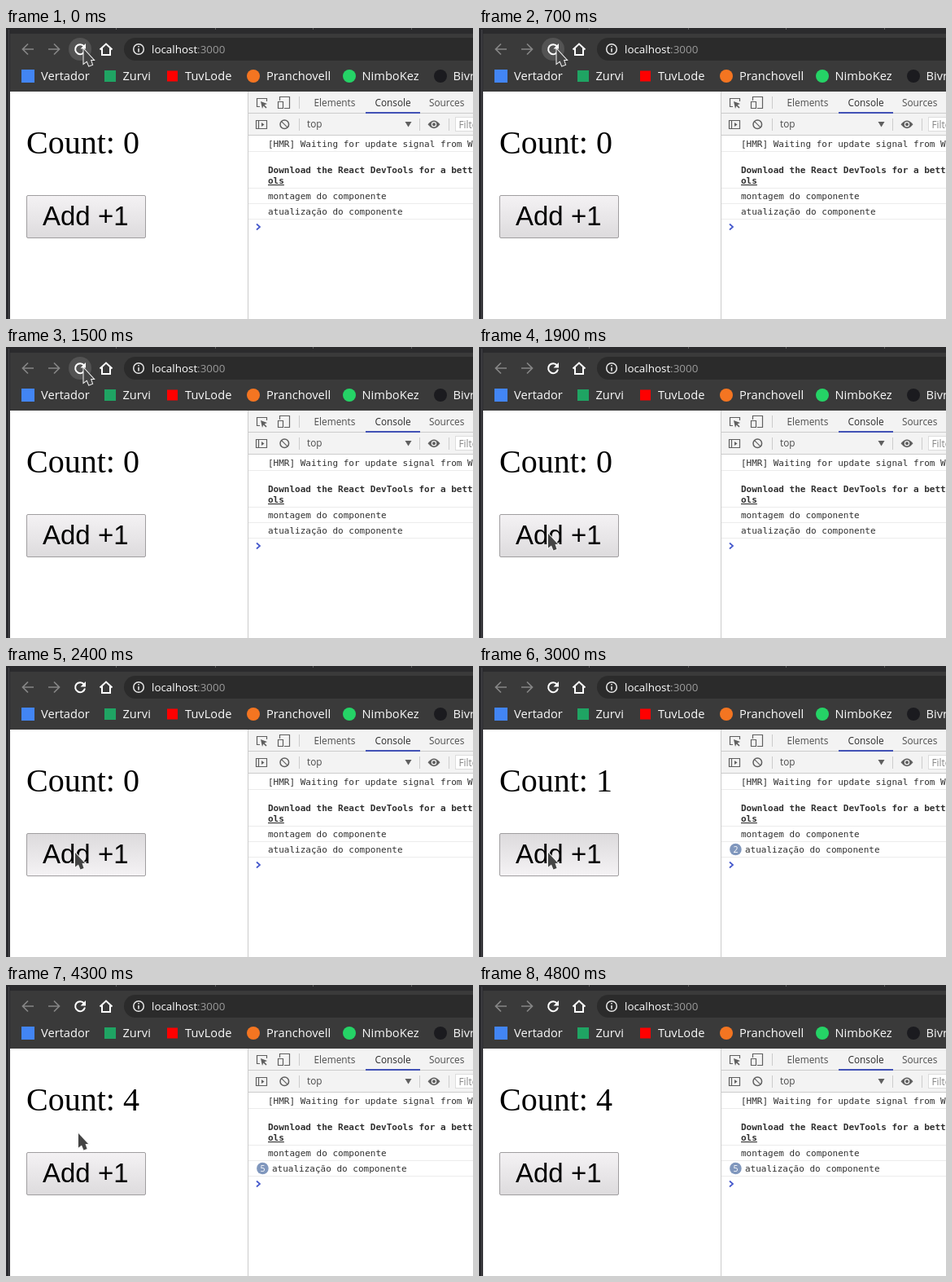
An HTML page for the animation above (4900 ms loop, 574 by 357 pixels).

```html
<!DOCTYPE html>
<html lang="pt">
<head>
<meta charset="utf-8">
<style>
html, body { margin: 0; height: 100%; overflow: hidden; background: #fff; }
svg { display: block; }
text { white-space: pre; }
.ui { font-family: "Open Sans", "Noto Sans", sans-serif; }
.mark { font-size: 14.67px; fill: #fafafa; }
.tab { font-size: 11.8px; fill: #4c4c4c; }
.log { font: 11px "DejaVu Sans Mono", monospace; fill: #303030; }
.nav { fill: none; stroke-width: 2; }
.tool { fill: none; stroke: #5f5f5f; stroke-width: 1.2; }
.solid { fill: #5f5f5f; stroke: none; }
.rule { stroke: #ccc; }
.row { stroke: #ececec; }
#cursor { fill: #444; stroke: #f4f4f4; stroke-width: 2; paint-order: stroke; }
</style>
</head>
<body>
<svg width="574" height="357" viewBox="0 0 574 357">
  <defs>
    <linearGradient id="up" x2="0" y2="1"><stop stop-color="#f4f2f4"/><stop offset="1" stop-color="#dddbdd"/></linearGradient>
    <linearGradient id="down" x2="0" y2="1"><stop stop-color="#dcdadc"/><stop offset="1" stop-color="#f5f3f5"/></linearGradient>
  </defs>

  <!-- browser bar -->
  <rect width="574" height="78" fill="#3a3a3a"/>
  <rect width="574" height="7" fill="#2b2b2d"/>
  <path d="M135.5 0v2M257.5 0v2M377.5 0v2M498.5 0v2" stroke="#606060"/>
  <rect x="145" y="12" width="460" height="28" rx="14" fill="#2b2b2b"/>
  <circle id="hover" cx="91" cy="26" r="14" fill="#535353"/>
  <g class="nav">
    <path d="M34 26H21M27 19.5L20.5 26l6.5 6.5M52 26h13M59 19.5l6.5 6.5-6.5 6.5" stroke="#868686" stroke-width="1.7"/>
    <path d="M96 22.6A6 6 0 1 0 97 27.5" stroke="#fff"/>
    <path d="M98 19v6.5h-6.5z" fill="#fff"/>
    <path d="M115.5 26.5L123 19.5l7.5 7M118 25v8h10v-8" stroke="#fff"/>
    <circle cx="163" cy="26" r="6.3" stroke="#e8e8e8" stroke-width="1.5"/>
    <path d="M163 25v4.5M163 22v1.6" stroke="#e8e8e8" stroke-width="1.6"/>
  </g>
  <text class="ui" x="179" y="31" font-size="13.4" fill="#fff">localhost<tspan fill="#9a9a9a">:3000</tspan></text>
  <rect x="19" y="51" width="16" height="16" fill="#4285f4"/>
  <rect x="121" y="52" width="14" height="14" fill="#1fa463"/>
  <rect x="198" y="52.5" width="13" height="13" fill="#f00"/>
  <circle cx="304" cy="59" r="8" fill="#f47521"/>
  <circle cx="422" cy="59" r="8" fill="#25d366"/>
  <circle cx="534" cy="59" r="8" fill="#1b1b1f"/>
  <g class="ui mark">
    <text x="43" y="64">Vertador</text>
    <text x="143.5" y="64">Zurvi</text>
    <text x="220" y="64">TuvLode</text>
    <text x="320" y="64">Pranchovell</text>
    <text x="437.5" y="64">NimboKez</text>
    <text x="549.5" y="64">Bivren</text>
  </g>

  <!-- page -->
  <text id="count" x="25" y="154" font-family="Liberation Serif, Times, serif" font-size="40"></text>
  <rect id="button" x="25.5" y="205.5" width="146" height="52" rx="1.5" stroke="#a09ea0"/>
  <text x="45" y="242" font-family="Liberation Sans, Arial, sans-serif" font-size="33">Add +1</text>

  <!-- developer tools -->
  <rect x="298" y="78" width="276" height="53" fill="#f3f3f3"/>
  <path class="rule" d="M297.5 78V357M298 104.5H574M298 131.5H574M360.5 84v15M360.5 111v15M508.5 111v15M544.5 111v15"/>
  <rect x="442" y="103" width="67" height="2" fill="#4252b5"/>
  <g class="tool">
    <path d="M312 96.5H308.5V86.5H320.5V90"/>
    <path class="solid" d="M313 90l8 3-3.4 1.4 3 3-1.2 1.2-3-3-1.4 3.4z"/>
    <path d="M336.5 89V84.5H348.5V98.5H342M334.5 90.5h6v8h-6z"/>
    <path d="M307.5 113.5h13v10h-13zM310.5 113.5v10"/>
    <path class="solid" d="M314 116l3.5 2.5-3.5 2.5z"/>
    <path d="M338.6 114.6l7.5 7.5"/>
    <circle cx="342.3" cy="118.3" r="5.3" stroke-width="1.5"/>
    <path class="solid" d="M518.5 118.3Q526 108.5 533.5 118.3Q526 128 518.5 118.3z"/>
    <circle cx="526" cy="118.3" r="2.6" stroke="#f3f3f3"/>
    <path class="solid" d="M490.5 115h8l-4 6.500z"/>
  </g>
  <rect x="552.5" y="109.5" width="40" height="17" fill="#fff" stroke="#ddd"/>
  <g class="ui tab">
    <text x="378.5" y="96">Elements</text>
    <text x="453.5" y="96" style="fill:#2c2c2c">Console</text>
    <text x="520" y="96">Sources</text>
    <text x="370" y="122">top</text>
    <text x="556.5" y="122.5" style="fill:#858585">Filter</text>
  </g>
  <path class="row" d="M298 151.5H574M298 196.5H574M298 215.5H574M298 234.5H574"/>
  <g class="log">
    <text x="322" y="146">[HMR] Waiting for update signal from WDS...</text>
    <g font-weight="bold">
      <text x="322" y="178">Download the React DevTools for a better</text>
      <text x="322" y="191" text-decoration="underline">ols</text>
    </g>
    <text x="322" y="210">montagem do componente</text>
    <text id="update" y="229">atualização do componente</text>
  </g>
  <g id="badge">
    <circle cx="315.4" cy="225" r="7.3" fill="#8097bd"/>
    <text id="times" class="ui" x="315.4" y="229" font-size="10.5" text-anchor="middle" fill="#fff"></text>
  </g>
  <path d="M308 240.5l4 3.5-4 3.5" fill="none" stroke="#4458cc" stroke-width="1.7"/>

  <!-- window edge -->
  <rect y="1" width="5" height="356" fill="#29292d"/>
  <path d="M3.5 2V357" stroke="#48484c"/>

  <path id="cursor" d="M0 0V17.5L4 14.5L6.5 20.5L10.500 19L8.500 13H12z"/>
</svg>
<script>
const el = id => document.getElementById(id);
const LOOP = 4900, STEP = 100;
const clicks = [[2400, 2600], [3000, 3100], [3500, 3800], [3900, 4000]];
const logged = [3000, 3100, 3800, 4000];
// time, x, y of the pointer
const path = [
  [1500, 95.5, 26], [1600, 94, 62], [1700, 91, 125], [1800, 87, 195], [1900, 85, 229],
  [4100, 85, 229], [4200, 87, 213], [4300, 89, 182], [4500, 91, 90], [4700, 95, 10]
];

function pointerAt(t) {
  if (t <= path[0][0]) return path[0].slice(1);
  const i = path.findIndex(p => p[0] >= t);
  if (i < 0) return null;
  const [t0, x0, y0] = path[i - 1], [t1, x1, y1] = path[i];
  const k = (t - t0) / (t1 - t0);
  return [x0 + (x1 - x0) * k, y0 + (y1 - y0) * k];
}

function draw(now) {
  const t = Math.floor(now % LOOP / STEP) * STEP;
  const pos = pointerAt(t);
  const pressed = clicks.some(([a, b]) => t >= a && t < b);
  const times = 1 + logged.filter(a => t >= a).length;

  el("count").textContent = "Count: " + clicks.filter(c => t >= c[1]).length;
  el("button").setAttribute("fill", pressed ? "url(#down)" : "url(#up)");
  el("times").textContent = times;
  el("badge").style.display = times > 1 ? "" : "none";
  el("update").setAttribute("x", times > 1 ? 327 : 322);
  el("hover").style.display = t <= 1500 ? "" : "none";
  el("cursor").style.display = pos ? "" : "none";
  if (pos) el("cursor").setAttribute("transform", `translate(${pos})`);
}

const start = performance.now();
function tick() {
  draw(performance.now() - start);
  requestAnimationFrame(tick);
}
tick();
</script>
</body>
</html>
```
